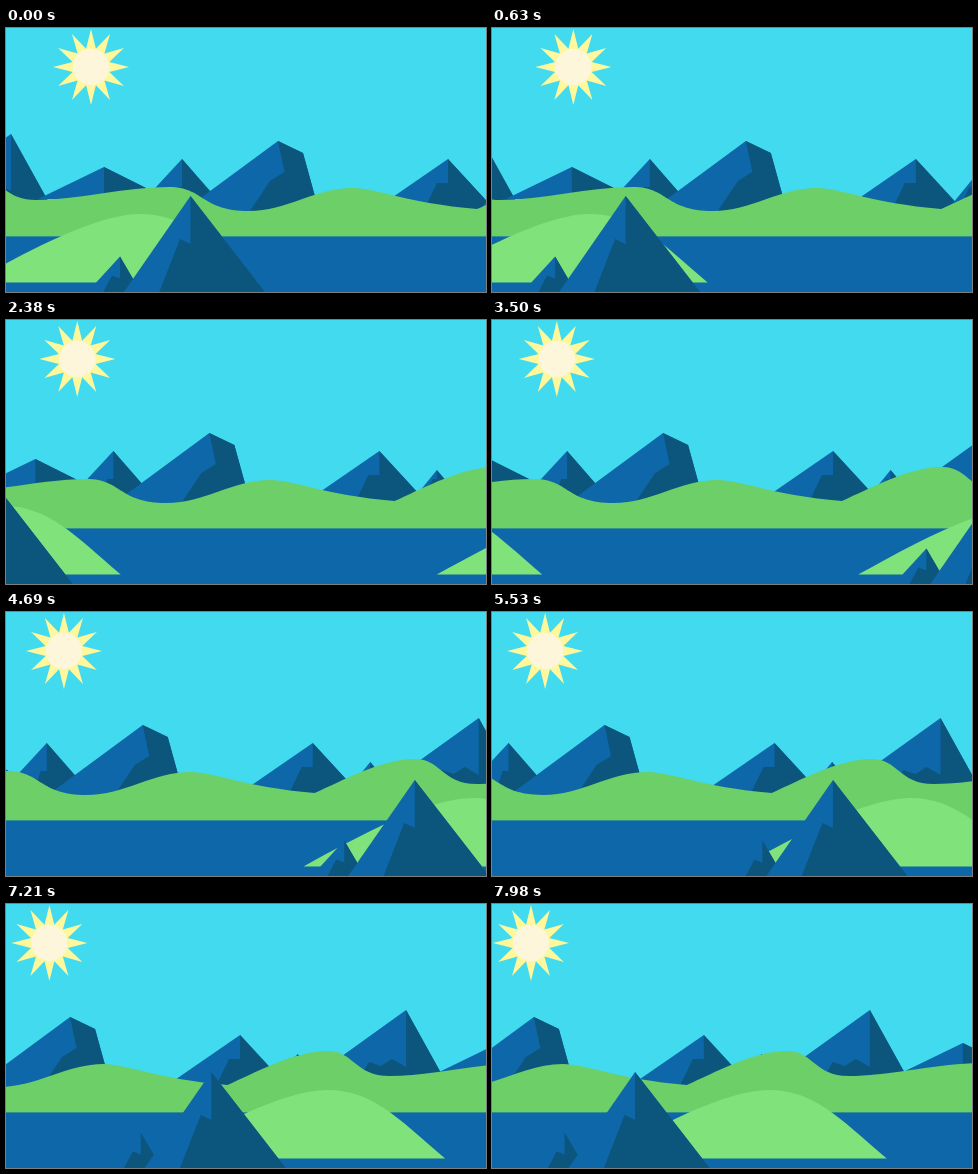
These frames come from a looping animation (480x264 px, 8 s). An HTML page:

```html
<!DOCTYPE html>
<html lang="en">
<head>
<meta charset="utf-8">
<title>Parallax landscape</title>
<style>
  html, body { margin: 0; width: 100%; height: 100%; overflow: hidden; background: #41daee; }
  svg { display: block; width: 100vw; height: 100vh; }
  .lit { fill: #0d67a8; }
  .shade { fill: #0c567d; }
</style>
</head>
<body>
<svg viewBox="0 0 480 264" preserveAspectRatio="none">
  <rect width="480" height="264" fill="#41daee"/>
  <g id="sun">
    <polygon id="rays" fill="#fef79c"/>
    <circle cx="85" cy="39" r="18.2" fill="#fdf6da"/>
  </g>
  <g id="peaks"></g>
  <g id="hills">
    <path fill="#6ccf68" d="M-132 181C-105 169-65 147-32 147C-5 147-5 172 30 172C70 172 120 159 163 159C198 159 195 183 243 183C280 183 310 160 347 160C370 160 400 175 471 181H472V210H-132Z"/>
  </g>
  <rect y="208.4" width="480" height="56" class="lit"/>
  <g id="meadow">
    <path fill="#80e27a" d="M-35 254.6C20 224 90 186 134 186C178 186 203 212 252 254.6Z"/>
  </g>
  <g id="front"></g>
</svg>
<script>
const LOOP = 8000, STEP = 70, PERIOD = 603, UNIT = 5.768;
const $ = id => document.getElementById(id);

// Mountain outlines are relative to the summit; both faces share it.
const mountain = (x, y, lit, shade) =>
  `<g transform="translate(${x} ${y})"><path class="lit" d="M0 0L${lit}Z"/>` +
  `<path class="shade" d="M0 0L${shade}Z"/></g>`;

$('peaks').innerHTML =
  mountain(5, 106, '41 74 -103 74', '41 74 -50 74 -37 52 -25 56 -14 49 0 57') +
  mountain(98, 139, '64 32 -66 32', '64 32 0 32') +
  mountain(176, 131, '48 55 -51 55', '48 55 -15 55 -6 28 0 28') +
  mountain(272, 113, '25 12 41 70 -95 70', '25 12 41 70 -28 70 -8 40 6.5 31') +
  mountain(442, 131, '47 51 -74 51', '47 51 -24 51 -11 24 0 24') +
  mountain(499.5, 150, '27 32 -26 32', '27 32 -14 32 -4 9 0 9');

$('front').innerHTML =
  mountain(114, 228.5, '21 36 -33 36', '21 36 -17 36 -8 19 0 22') +
  mountain(184.5, 168, '76 98 -68 98', '76 98 -32 98 -10.5 43 0 48');

$('rays').setAttribute('points', Array.from({ length: 24 }, (_, i) => {
  const a = i * Math.PI / 12, r = i % 2 ? 19 : 38;
  return `${85 + r * Math.sin(a)},${39 - r * Math.cos(a)}`;
}).join(' '));

// Repeat each scrolling strip once to the right.
for (const id of ['peaks', 'hills', 'meadow', 'front']) {
  const g = $(id), copy = document.createElementNS(g.namespaceURI, 'g');
  copy.innerHTML = g.innerHTML;
  copy.setAttribute('transform', `translate(${PERIOD} 0)`);
  g.append(copy);
}

const layers = Object.entries({ sun: 1, peaks: 5, hills: 6, meadow: 10, front: 14 })
  .map(([id, depth]) => [$(id), depth * UNIT / 1000]);

function draw(ms) {
  const t = Math.floor(ms / STEP) * STEP;
  for (const [g, speed] of layers) {
    g.setAttribute('transform', `translate(${(-speed * t).toFixed(2)} 0)`);
  }
}

const start = performance.now();
function tick() {
  draw((performance.now() - start) % LOOP);
  requestAnimationFrame(tick);
}
tick();
</script>
</body>
</html>
```
